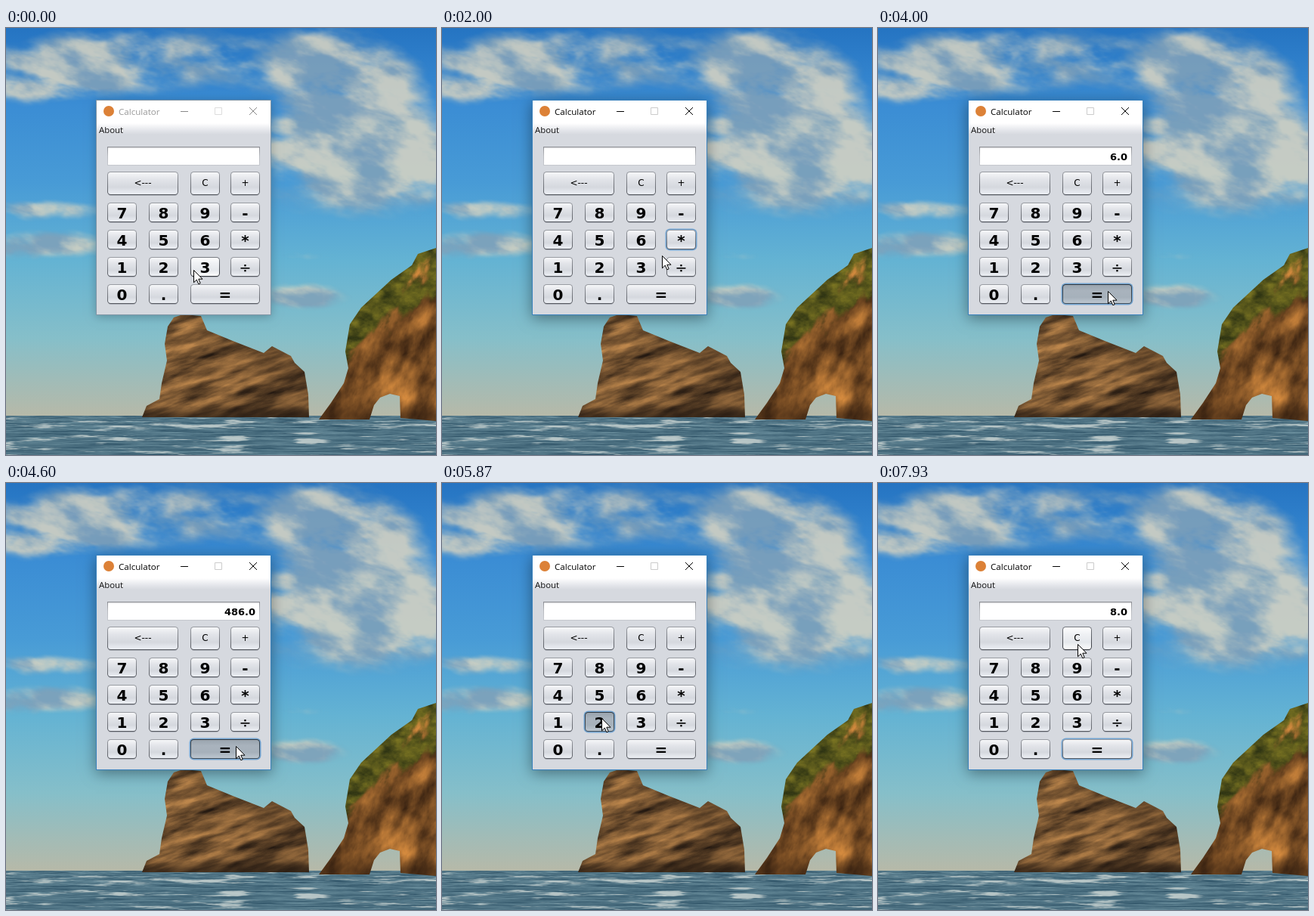
An HTML page with a canvas that plays this animation: 569x565 px, repeating every 8000 ms.

```html
<!DOCTYPE html>
<html>
<head>
<meta charset="utf-8">
<style>
  html, body { margin: 0; width: 100%; height: 100%; overflow: hidden; }
  canvas { display: block; }
</style>
</head>
<body>
<canvas id="stage" width="569" height="565"></canvas>
<script>
const W = 569, H = 565, HORIZON = 514, TICKS = 120, FPS = 15;
const SANS = '"DejaVu Sans", sans-serif', UI = '"Open Sans", sans-serif';
const stage = document.getElementById('stage'), ctx = stage.getContext('2d');

// ---- maths and noise ----
let seed = 7;
const rnd = () => (seed = seed * 16807 % 2147483647) / 2147483647;
const lattice = Array.from({ length: 4096 }, rnd);
const cell = (i, j) => lattice[(i & 63) + 64 * (j & 63)];
const clamp = v => Math.max(0, Math.min(1, v));
const lerp = (a, b, u) => a + (b - a) * u;
const mix = (a, b, u) => a.map((v, i) => lerp(v, b[i], u));
const bump = d => Math.exp(-d * d);

function smooth(from, to, v) {
  const u = clamp((v - from) / (to - from));
  return u * u * (3 - 2 * u);
}

function noise(x, y) {
  const i = Math.floor(x), j = Math.floor(y), u = smooth(0, 1, x - i), v = smooth(0, 1, y - j);
  return lerp(lerp(cell(i, j), cell(i + 1, j), u), lerp(cell(i, j + 1), cell(i + 1, j + 1), u), v);
}

function fractal(x, y) {
  let sum = 0;
  for (let k = 0, amp = 0.5; k < 5; k++, amp /= 2) sum += amp * noise(x * 2 ** k + 17 * k, y * 2 ** k);
  return clamp((sum - 0.484) * 1.5 + 0.5);
}

// Paint rows top..bottom from a function giving [r, g, b] and opacity.
function texture(top, bottom, pixel) {
  const layer = document.createElement('canvas');
  layer.width = W; layer.height = H;
  const g = layer.getContext('2d'), image = g.createImageData(W, bottom - top);
  for (let y = top, p = 0; y < bottom; y++) {
    for (let x = 0; x < W; x++, p += 4) {
      const [color, alpha = 1] = pixel(x, y);
      image.data.set([...color, alpha * 255], p);
    }
  }
  g.putImageData(image, 0, top);
  return layer;
}

// ---- wallpaper ----
// centre x, centre y, half width, half height, strength
const CLOUDS = [
  [95, 50, 115, 44, 1], [20, 80, 90, 18, 0.6], [275, 35, 110, 40, 0.75],
  [450, 75, 90, 75, 1.1], [475, 180, 150, 62, 1.15],
  [50, 240, 95, 14, 0.9], [45, 287, 95, 22, 0.85], [395, 352, 62, 20, 0.85], [400, 300, 60, 12, 0.5]
];

function cloud(x, y) {
  const cover = CLOUDS.reduce((sum, [cx, cy, rx, ry, s]) =>
    sum + s * Math.exp(-(((x - cx) / rx) ** 2) - ((y - cy) / ry) ** 2), 0);
  const body = fractal(x / 80 + y / 150, y / 38 - x / 160), light = fractal(x / 60 + 20, y / 32 - x / 120 + 9);
  return [mix([128, 160, 184], [215, 211, 193], smooth(0.25, 0.75, light)),
    0.88 * smooth(0.28, 0.85, cover * (0.3 + 1.3 * body))];
}

function stackStone(x, y) {
  const strata = fractal(x / 34 + y / 50, y / 10 + x / 40);
  const light = lerp(1.15, 0.8, (x - 200) / 200) * lerp(1, 0.35, smooth(495, HORIZON, y));
  return [mix([36, 25, 17], [184, 131, 74], strata * light)];
}

function archStone(x, y) {
  const grain = fractal(x / 24, y / 32 + x / 50), depth = y - 291 - (W - x) * 0.85;
  const stone = mix([46, 27, 14], [212, 138, 62], grain * lerp(1, 0.5, smooth(490, HORIZON, y)));
  const moss = mix([42, 48, 18], [132, 124, 36], fractal(x / 14, y / 10));
  return [mix(moss, stone, smooth(25, 50, depth + (grain - 0.5) * 70))];
}

function water(x, y) {
  const near = (y - HORIZON) / (H - HORIZON);
  const swell = fractal(x / (24 + 30 * near), y / (2.5 + 3 * near));
  const foam = fractal(x / 50, y / 4 + 40) + 0.22 * bump((y - 526) / 4) + 0.16 * bump((y - 546) / 5);
  return [mix(mix([46, 82, 102], [110, 146, 160], swell), [208, 217, 214], 0.8 * smooth(0.62, 0.92, foam))];
}

const outline = points => new Path2D('M' + points + 'Z');
const STACK = outline('180,515 186,500 203,491 206,470 213,440 210,418 214,395 222,383 234,379 258,381 266,400 ' +
  '300,414 341,430 352,421 377,434 382,443 395,455 400,485 401,515');
const ARCH = outline('414,518 430,496 447,470 453,450 449,428 455,392 470,370 510,333 537,314 545,299 ' +
  '569,291 569,520 522,516 521,487 508,484 495,489 487,499 481,518');

function vertical(g, y0, y1, ...colors) {
  const grad = g.createLinearGradient(0, y0, 0, y1);
  colors.forEach((color, i) => grad.addColorStop(i / (colors.length - 1), color));
  return grad;
}

function paintWallpaper() {
  const layer = texture(HORIZON - 1, H, water), g = layer.getContext('2d');
  g.fillStyle = vertical(g, 0, HORIZON, '#2574c2', '#3b8dd4', '#489bd6', '#64b3d3', '#86bfc9', '#b7b9a8');
  g.fillRect(0, 0, W, HORIZON - 1);
  g.drawImage(texture(0, 400, cloud), 0, 0);
  for (const [path, stone] of [[STACK, stackStone], [ARCH, archStone]]) {
    g.save();
    g.clip(path);
    g.drawImage(texture(280, 520, stone), 0, 0);
    g.restore();
  }
  return layer;
}

// ---- calculator ----
const COLUMNS = [134, 189, 244, 297];
const KEYS = [['<---', 134, 190, 94, 31], ['C', 244, 190, 39, 31], ['+', 297, 190, 39, 31]];
['789-', '456*', '123÷', '0.='].forEach((row, r) => [...row].forEach((key, c) =>
  KEYS.push([key, COLUMNS[c], 231 + 36 * r, key === '=' ? 92 : 39, 26])));

// press tick, key, ticks held (one when left out)
const PRESSES = [
  [17, '2', 2], [27, '*'], [32, '3'], [40, '='],
  [60, '='], [62, '='], [64, '='], [66, '='], [69, '='], [78, 'C'],
  [88, '2'], [95, '*'], [107, '4'], [113, '=']
];

// Run the presses up to a tick; pressing "=" again repeats the multiplication.
function calculatorAt(tick) {
  let display = '', first = 0, factor = null, focus = null, down = false;
  for (const [at, key, held = 1] of PRESSES) {
    if (at > tick) break;
    focus = key;
    down = tick < at + held;
    if (down) break;
    if (key === '=') {
      factor ??= Number(display);
      first *= factor;
      display = first.toFixed(1);
    } else if (key === '*') {
      first = Number(display);
      factor = null;
      display = '';
    } else {
      display = key === 'C' ? '' : display + key;
    }
  }
  return { display, focus, down };
}

// start tick, end tick, x and y reached by the pointer tip
const MOVES = [
  [1, 6, 221, 335], [10, 14, 212, 320], [20, 26, 317, 284], [28, 32, 267, 318], [34, 39, 305, 348],
  [71, 77, 265, 207], [79, 83, 212, 311], [89, 94, 315, 288], [97, 100, 175, 290],
  [104, 107, 167, 284], [108, 112, 300, 350], [114, 119, 265, 213]
];

function pointerAt(tick) {
  let x = 249, y = 320;
  for (const [from, to, tx, ty] of MOVES) {
    const u = clamp((tick - from) / (to - from));
    x = lerp(x, tx, u);
    y = lerp(y, ty, u);
  }
  return [Math.round(x), Math.round(y)];
}

function label(text, x, y, font, color = '#000', align = 'left') {
  ctx.font = font;
  ctx.fillStyle = color;
  ctx.textAlign = align;
  ctx.fillText(text, x, y);
}

function box(x, y, w, h, fill, radius = 0) {
  ctx.fillStyle = fill;
  ctx.beginPath();
  ctx.roundRect(x, y, w, h, radius);
  ctx.fill();
}

function strokePath(path, color) {
  ctx.strokeStyle = color;
  ctx.lineWidth = 1;
  ctx.stroke(new Path2D(path));
}

function drawWindow(active) {
  ctx.save();
  ctx.shadowColor = active ? 'rgba(0,0,0,.4)' : 'rgba(0,0,0,.25)';
  ctx.shadowBlur = active ? 18 : 12;
  ctx.shadowOffsetY = active ? 4 : 2;
  box(119, 95, 232, 285, active ? '#3b82bd' : '#8296a6');
  ctx.restore();
  box(120, 96, 230, 30, '#fff');
  box(120, 126, 230, 253, '#d6d9df');
  box(120, 126, 230, 15, vertical(ctx, 126, 141, '#fff', '#f0f1f4', '#e2e4e9', '#d6d9df'));
  box(129, 103, 14, 14, '#dc8137', 7);

  const ink = active ? '#000' : '#888';
  label('Calculator', 149, 115, '11.6px ' + UI, active ? '#000' : '#999');
  strokePath('M231 110.5h10M322 105l10 10m0-10l-10 10', ink);
  strokePath('M276.5 105.5h9v9h-9z', active ? '#ccc' : '#ddd');
  label('About', 123, 139, '11.4px ' + UI, '#111');
}

function drawDisplay(text) {
  box(134, 157, 202, 25, vertical(ctx, 157, 182, '#8b8d92', '#b9bbc0', '#c5c8ce'));
  box(135, 158, 200, 23, '#fff');
  box(135, 158, 200, 2, vertical(ctx, 158, 160, '#d6d7da', '#fff'));
  label(text, 330, 175, 'bold 13px ' + SANS, '#000', 'right');
}

// edge top, edge bottom, then the face from top to bottom
const STYLES = {
  normal: ['#9a9da3', '#565960', '#f8f9fa', '#e2e4e9', '#d5d8de', '#eff2f7'],
  hover: ['#777b82', '#34373d', '#fff', '#eff1f4', '#e5e8ec', '#fff'],
  pressed: ['#30383f', '#46515b', '#97a2ac', '#a9b3bd', '#a6b1bb', '#bfc9d2']
};

function drawKey([key, x, y, w, h], state, focused) {
  const [edgeTop, edgeBottom, ...face] = STYLES[state], small = h > 26;
  if (focused) box(x - 1.5, y - 1.5, w + 3, h + 3, '#73a4d1', 6);
  else box(x + 1, y + 1, w - 2, h, 'rgba(120,125,135,.45)', 4);
  box(x, y, w, h, vertical(ctx, y, y + h, edgeTop, edgeBottom), 4.5);
  box(x + 1, y + 1, w - 2, h - 2, vertical(ctx, y, y + h, ...face), 3.5);
  const font = small ? '12px ' : key === '÷' ? '19px ' : 'bold 20px ';
  label(key, x + w / 2, y + (small ? 19 : 21), font + SANS, '#000', 'center');
}

const ARROW = outline('-.5,.5 -.5,16.8 3.3,13.1 5.8,18.8 8.2,17.8 5.8,12.2 11,12.2');

function drawPointer(x, y) {
  ctx.save();
  ctx.translate(x, y);
  ctx.fillStyle = '#fff';
  ctx.fill(ARROW);
  strokePath(ARROW, '#000');
  ctx.restore();
}

const wallpaper = paintWallpaper();

function render(tick) {
  const [px, py] = pointerAt(tick), { display, focus, down } = calculatorAt(tick);
  ctx.drawImage(wallpaper, 0, 0);
  drawWindow(tick >= 16);
  drawDisplay(display);
  for (const keyBox of KEYS) {
    const [key, x, y, w, h] = keyBox, focused = key === focus;
    const over = px >= x && px < x + w && py >= y && py < y + h;
    drawKey(keyBox, focused && down ? 'pressed' : over ? 'hover' : 'normal', focused);
  }
  drawPointer(px, py);
}

const start = performance.now();
function frame() {
  // The small lead absorbs rounding of the tick boundaries.
  const ms = performance.now() - start + 7;
  render(Math.floor(ms * FPS / 1000) % TICKS);
  requestAnimationFrame(frame);
}
frame();
</script>
</body>
</html>
```
